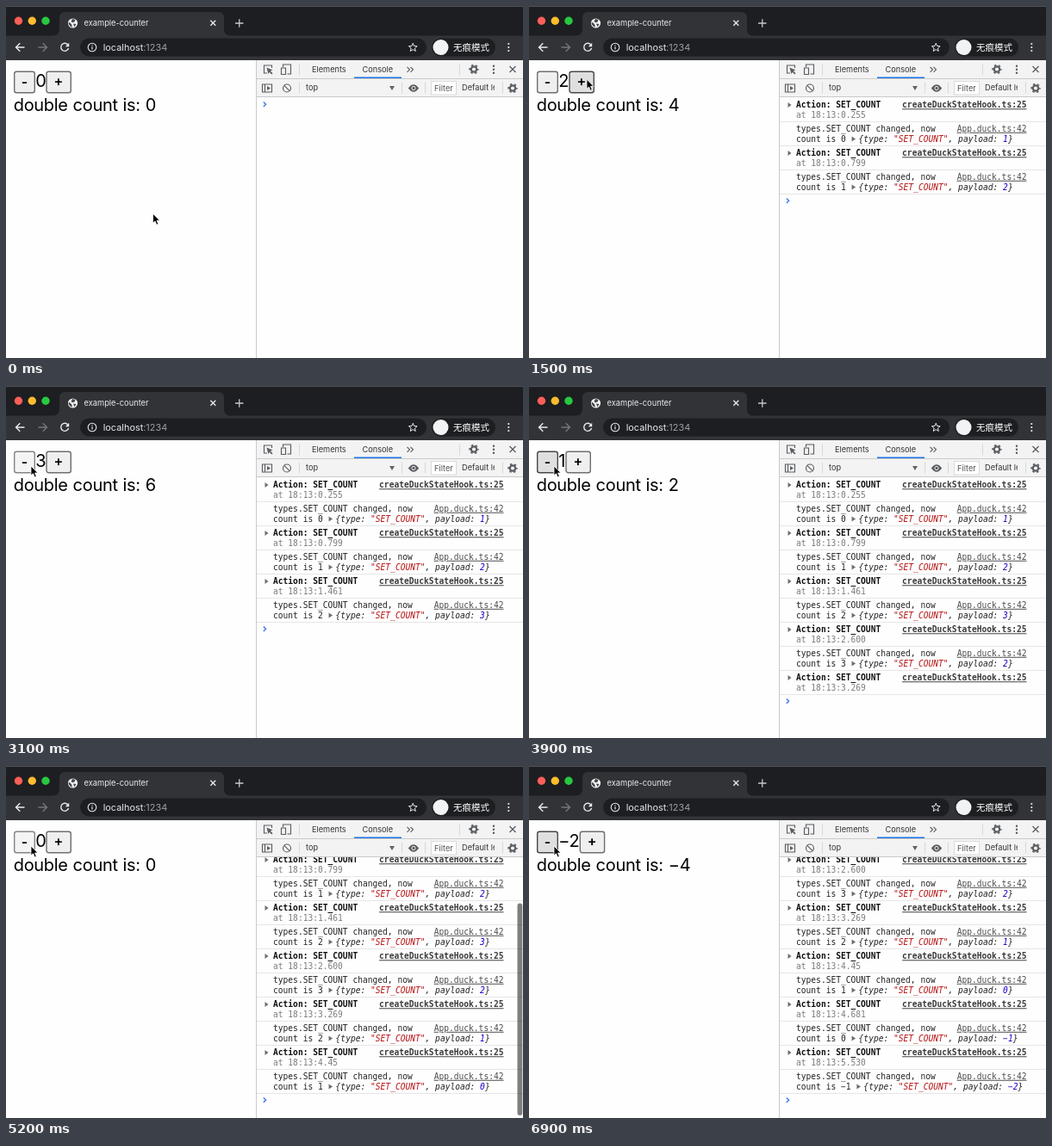
Write an HTML page that moves like this. It is 600x409 px and loops after 7000 ms.

```html
<!DOCTYPE html>
<html lang="en">
<head>
<meta charset="utf-8">
<title>example-counter</title>
<style>
  html, body { margin: 0; width: 100%; height: 100%; overflow: hidden; background: #fff; }
  svg { display: block; width: 600px; height: 409px; }
  text { white-space: pre; font-family: Inter, sans-serif; }
  .page { font-size: 20px; letter-spacing: -.3px; word-spacing: .55px; fill: #000; }
  .sign { font-size: 16px; font-weight: 600; text-anchor: middle; fill: #000; }
  .ui { font-size: 9.2px; fill: #333; }
  .icon { fill: none; stroke: #5a5d61; stroke-width: 1.15; }
  .nav { fill: none; stroke: #e8eaed; stroke-width: 1.4; }
  .mono text { font: 9.6px "DejaVu Sans Mono", monospace; fill: #222; }
  .mono .action { font-weight: 700; fill: #111; }
  .mono .link { text-decoration: underline; text-anchor: end; fill: #4c4c4c; }
  .mono .bold { font-weight: 700; fill: #3a3a3a; }
  .mono .stamp { fill: #7d7d7d; }
  .mono .preview { font-style: italic; }
  .preview .string { fill: #b81414; }
  .preview .number { fill: #1c00cf; }
  .rule { stroke: #e6e6e6; }
  .button { fill: #efefef; stroke: #6e6e6e; stroke-width: 1.4; }
  .button.hover { fill: #dfdfdf; stroke: #484848; }
  .button.active { fill: #f4f4f4; stroke: #858585; }
</style>
</head>
<body>
<svg viewBox="0 0 600 409">
  <defs>
    <clipPath id="consoleClip"><rect x="291" y="106" width="309" height="303"/></clipPath>
    <clipPath id="levelClip"><rect x="527" y="86" width="40" height="19"/></clipPath>
    <g id="gear" class="icon">
      <circle r="3.2" style="stroke-width:2.200"/>
      <circle r="4.900" style="stroke-width:1.600" stroke-dasharray="2.400 2.730" stroke-dashoffset="1.200"/>
    </g>
  </defs>
  <rect width="600" height="409" fill="#fefefe"/>

  <!-- window frame and tab -->
  <rect width="600" height="36" fill="#1d1e21"/>
  <path d="M54 34.500q8 0 8-8V14q0-7 7-7H246q7 0 7 7V26.500q0 8 8 8H600V63H0V34.500z" fill="#323336"/>
  <path d="M0 .5H600" stroke="#505154"/>
  <circle cx="14.500" cy="17.200" r="4.700" fill="#fe5f57"/>
  <circle cx="30.300" cy="17.200" r="4.700" fill="#febc2e"/>
  <circle cx="46" cy="17.200" r="4.700" fill="#28c840"/>
  <circle cx="77.500" cy="20" r="5.600" fill="#f1f3f4"/>
  <path d="M73 18.500l3 2.500 1 3.500-2-.5-2.500-3zM77 15l3.500 1-1 2.500-2.500.8-1.500-1.300zM78 20.500l3.500.5-2 3.200z" fill="#46484c"/>
  <text x="90.500" y="23.200" font-size="9.300" fill="#e8eaed">example-counter</text>
  <path class="nav" d="M237.300 16.800l6 6m0-6l-6 6" style="stroke-width:1.300"/>
  <path class="nav" d="M266 20h9.500m-4.750-4.750v9.500" style="stroke:#c4c7cb;stroke-width:1.300"/>

  <!-- toolbar -->
  <path class="nav" d="M21.500 48H11.500m4.800-4.800L11.500 48l4.800 4.800"/>
  <path class="nav" d="M37.500 48h10m-4.800-4.800l4.800 4.800-4.800 4.800" style="stroke:#75777b"/>
  <path class="nav" d="M72 45.300a4.500 4.500 0 1 0 .6 3.700"/>
  <path d="M73.200 42.800v4.400h-4.400z" fill="#e8eaed"/>
  <rect x="86" y="37.500" width="402" height="21" rx="10.500" fill="#1d1e21"/>
  <circle class="nav" cx="100" cy="48" r="4.800" style="stroke-width:1.100"/>
  <path class="nav" d="M100 47.300v3.300m0-5.300v1" style="stroke-width:1.200"/>
  <text x="112.700" y="51.800" font-size="10.900" fill="#e8eaed">localhost<tspan fill="#9aa0a6">:1234</tspan></text>
  <path id="star" class="nav" style="stroke-width:1"/>
  <rect x="494" y="37.500" width="74" height="21" rx="10.500" fill="#1d1e21"/>
  <circle cx="504.500" cy="48" r="9" fill="#f1f3f4"/>
  <text x="519" y="51.800" style="font:500 10.500px 'Noto Sans CJK SC','Noto Sans CJK',sans-serif" fill="#fff">无痕模式</text>
  <g fill="#e8eaed"><circle cx="583.300" cy="44" r="1.100"/><circle cx="583.300" cy="48" r="1.100"/><circle cx="583.300" cy="52" r="1.100"/></g>

  <!-- page -->
  <rect id="minus" class="button" x="9.700" y="76.200" width="23.600" height="24.600" rx="2.500"/>
  <text class="sign" x="21.500" y="94">-</text>
  <text id="count" class="page" x="34.300" y="94"></text>
  <g id="plusGroup">
    <rect id="plus" class="button" x=".7" y="76.200" width="28.300" height="24.600" rx="2.500"/>
    <text class="sign" x="14.600" y="93.200">+</text>
  </g>
  <text id="double" class="page" x="8.700" y="122"></text>

  <!-- developer tools -->
  <rect x="291" y="63" width="309" height="43" fill="#f3f3f3"/>
  <path d="M290.500 63V409M291 84.500H600M291 105.500H600" stroke="#cacaca"/>
  <path d="M340.500 67.500v13M526.500 67.500v13M340.500 88.500v13M459.500 88.500v13M486.500 88.500v13M576.500 88.500v13" stroke="#d8d8d8"/>
  <path class="icon" d="M303 78h-3.500v-9h9v3"/>
  <path d="M302.500 71.500l7 3-2.700 1 2.700 2.700-1.200 1.200-2.700-2.700-1.200 2.500z" fill="#5a5d61"/>
  <path class="icon" d="M321.500 71v-3h9v11h-4M319.500 72h5v7.500h-5z"/>
  <text class="ui" x="355" y="76.800">Elements</text>
  <text class="ui" x="413.500" y="76.800">Console</text>
  <rect x="404" y="82.500" width="55" height="1.500" fill="#1a73e8"/>
  <path class="icon" d="M465.500 70.800l3 3-3 3m4-6l3 3-3 3"/>
  <use href="#gear" x="543" y="73.500"/>
  <g fill="#5a5d61"><circle cx="566" cy="69.700" r="1.200"/><circle cx="566" cy="73.700" r="1.200"/><circle cx="566" cy="77.700" r="1.200"/></g>
  <path class="icon" d="M584.500 70l7 7m0-7l-7 7" style="stroke-width:1.300"/>

  <path class="icon" d="M297.500 91h11v9h-11zM300.500 91v9"/>
  <path d="M303 93l4 2.500-4 2.500z" fill="#5a5d61"/>
  <circle class="icon" cx="326" cy="95.500" r="4.500"/>
  <path class="icon" d="M322.800 92.300l6.400 6.400"/>
  <text class="ui" x="348" y="98.300">top</text>
  <path d="M445 93h6l-3 5z" fill="#5f6368"/>
  <path d="M466.800 95.500q6.200-8.500 12.400 0q-6.200 8.500-12.400 0z" fill="#5a5d61"/>
  <circle cx="473" cy="95.500" r="2.100" fill="#5a5d61" stroke="#f3f3f3"/>
  <rect x="493.500" y="87.500" width="29" height="15.500" fill="#fff" stroke="#dadada"/>
  <text class="ui" x="497" y="98.700" fill-opacity=".85">Filter</text>
  <text class="ui" x="529" y="98.300" clip-path="url(#levelClip)">Default levels</text>
  <use href="#gear" x="588" y="95.500"/>

  <g clip-path="url(#consoleClip)">
    <g id="console" class="mono">
      <path id="prompt" d="M298.800 -2.700l2.800 2.700-2.800 2.700" fill="none" stroke="#3b78e7" stroke-width="1.400"/>
    </g>
    <rect id="thumb" x="593.500" width="5.800" rx="2.900" fill="#000"/>
  </g>
  <path id="cursor" d="M0 0V11l2.500-2.300 1.800 4.200 2-.9-1.800-4H8z" fill="#000" stroke="#fff" stroke-width=".8"/>
</svg>

<script>
const LOOP = 7000, STEP = 100, TOP = 106, VIEW = 302, ROW = 56;
const $ = id => document.getElementById(id);

// click: counter changes; log: action line appears; detail: reducer line appears
const events = [
  { click: 900, log: 1000, stamp: "0.255", to: 1 },
  { click: 1400, log: 1500, stamp: "0.799", to: 2 },
  { click: 2100, log: 2200, stamp: "1.461", to: 3 },
  { click: 3200, log: 3300, stamp: "2.600", to: 2 },
  { click: 3900, log: 3900, detail: 4000, stamp: "3.269", to: 1 },
  { click: 4600, log: 4700, stamp: "4.45", to: 0 },
  { click: 5300, log: 5300, stamp: "4.681", to: -1 },
  { click: 6100, log: 6100, stamp: "5.530", to: -2 }
];
const path = [
  { t: 0, x: 170.5, y: 241.3 }, { t: 700, x: 67, y: 85.3 },
  { t: 2500, x: 67, y: 85.3 }, { t: 3000, x: 29, y: 93 }
];

const signed = n => String(n).replace("-", "−");
const show = (el, on) => el.setAttribute("visibility", on ? "visible" : "hidden");

function addGroup(html) {
  const g = document.createElementNS("http://www.w3.org/2000/svg", "g");
  g.innerHTML = html;
  $("console").append(g);
  return g;
}

events.forEach((e, i) => {
  const y = TOP + i * ROW, from = i ? events[i - 1].to : 0;
  const label = `count is ${signed(from)} `;
  const x = 310 + label.length * 5.78;
  e.detail ??= e.log;
  e.actionRow = addGroup(`
    <path d="M300.500 ${y + 6}l4 3-4 3z" fill="#6e6e6e"/>
    <text class="action" x="310" y="${y + 12.3}">Action: SET_COUNT</text>
    <text class="link bold" x="577.500" y="${y + 12.3}">createDuckStateHook.ts:25</text>
    <text class="stamp" x="310" y="${y + 23.8}">at 18:13:${e.stamp}</text>
    <path class="rule" d="M291 ${y + 28.5}H600"/>`);
  e.detailRow = addGroup(`
    <text x="310" y="${y + 39.8}">types.SET_COUNT changed, now</text>
    <text class="link" x="577.500" y="${y + 39.8}">App.duck.ts:42</text>
    <text x="310" y="${y + 51.6}">${label}</text>
    <path d="M${x + 1} ${y + 45.5}l4.500 3-4.500 3z" fill="#6e6e6e"/>
    <text class="preview" x="${x + 9}" y="${y + 51.6}">{type: <tspan class="string">"SET_COUNT"</tspan>, payload: <tspan class="number">${signed(e.to)}</tspan>}</text>
    <path class="rule" d="M291 ${y + 56.5}H600"/>`);
});

$("star").setAttribute("d", "M" + Array.from({ length: 10 }, (_, i) => {
  const a = i * Math.PI / 5, r = i % 2 ? 2.3 : 5.1;
  return `${472.3 + r * Math.sin(a)} ${48.3 - r * Math.cos(a)}`;
}).join("L") + "z");

function cursorAt(t) {
  const i = path.findIndex(p => p.t > t);
  if (i < 0) return path[path.length - 1];
  const a = path[i - 1], b = path[i], k = (t - a.t) / (b.t - a.t);
  const s = k * k * (3 - 2 * k);
  return { x: a.x + (b.x - a.x) * s, y: a.y + (b.y - a.y) * s };
}

function setButton(el, left, width, cursor, pressed) {
  const over = cursor.x >= left && cursor.x <= left + width && cursor.y >= 76 && cursor.y <= 101;
  el.setAttribute("class", "button" + (over ? (pressed ? " active" : " hover") : ""));
}

function drawConsole(t) {
  let height = 0, last = 0;
  for (const e of events) {
    show(e.actionRow, t >= e.log);
    show(e.detailRow, t >= e.detail);
    if (t >= e.log) height += ROW / 2;
    if (t >= e.detail) { height += ROW / 2; last = e.detail; }
  }
  const scroll = Math.max(0, height - 274);
  $("console").setAttribute("transform", `translate(0 ${-scroll})`);
  $("prompt").setAttribute("transform", `translate(0 ${TOP + height + 8.3})`);

  const total = VIEW + scroll, thumb = $("thumb");
  const fade = Math.min(1, Math.max(0, (800 - (t - last)) / 300));
  thumb.setAttribute("y", TOP + 2 + VIEW * scroll / total);
  thumb.setAttribute("height", VIEW * VIEW / total - 4);
  thumb.setAttribute("opacity", scroll ? 0.5 * fade : 0);
}

function draw(t) {
  const done = events.filter(e => t >= e.click);
  const count = done.length ? done[done.length - 1].to : 0;
  const cursor = cursorAt(t);
  const pressed = events.some(e => t >= e.click - 200 && t < e.click);
  const plusX = 34 + (count < 0 ? 12.3 : 0) + (Math.abs(count) === 1 ? 8.3 : 12.3);

  $("count").textContent = signed(count);
  $("double").textContent = "double count is: " + signed(count * 2);
  $("plusGroup").setAttribute("transform", `translate(${plusX} 0)`);
  setButton($("minus"), 9, 25, cursor, pressed);
  setButton($("plus"), plusX, 30, cursor, pressed);
  $("cursor").setAttribute("transform", `translate(${cursor.x} ${cursor.y})`);
  drawConsole(t);
}

function tick() {
  draw(Math.floor(performance.now() % LOOP / STEP) * STEP);
  requestAnimationFrame(tick);
}
tick();
</script>
</body>
</html>
```
